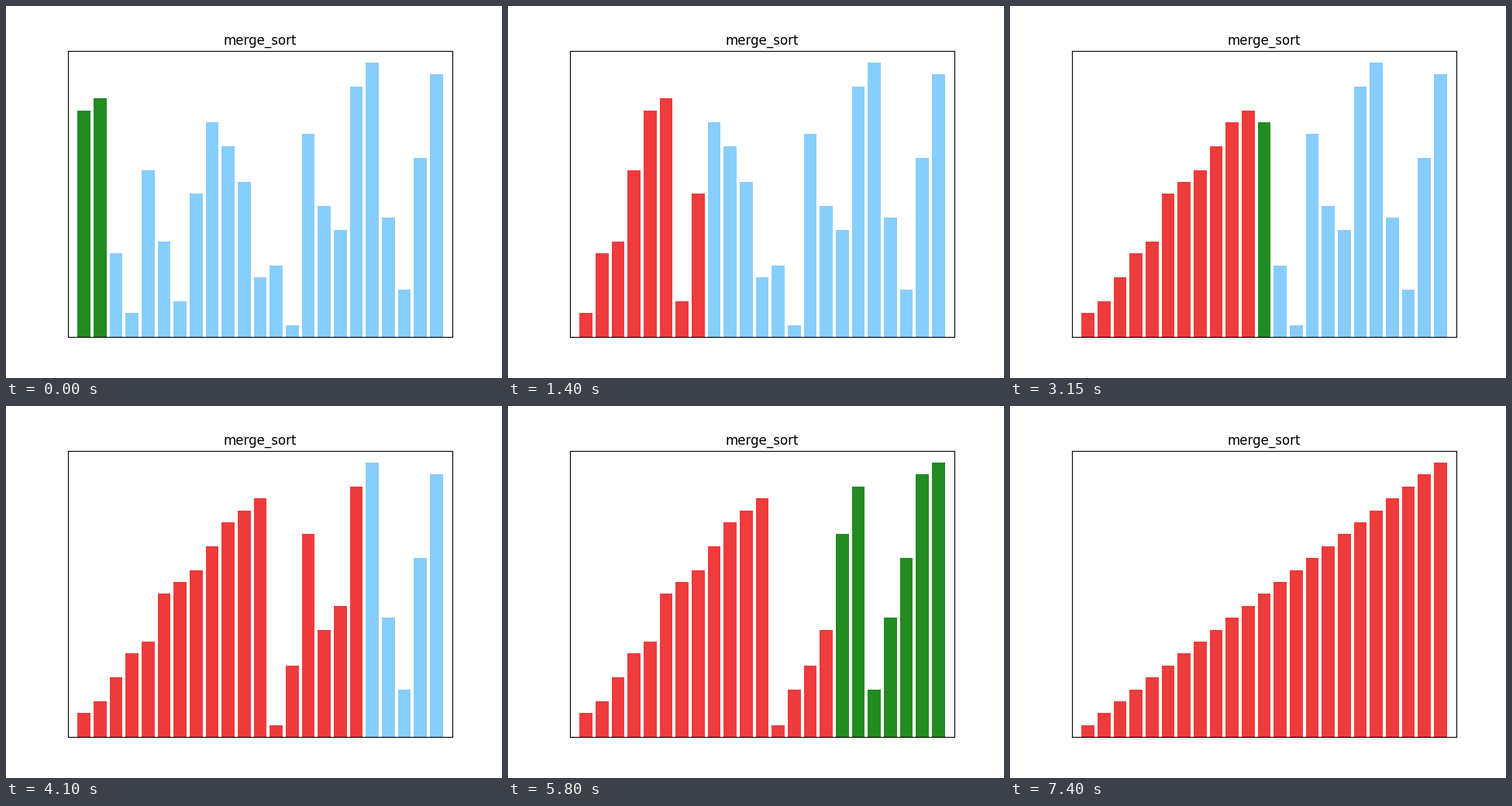
Animation of 640 by 480 pixels, one loop 7.5 s. Source, as a matplotlib script:

```python
import matplotlib.pyplot as plt
from matplotlib.animation import FuncAnimation

VALUES = [19, 20, 7, 2, 14, 8, 3, 12, 18, 16, 13, 5,
          6, 1, 17, 11, 9, 21, 23, 10, 4, 15, 22]
N = len(VALUES)
IDLE, ACTIVE, PLACED = "#87CEFF", "#228B22", "#EE3B3B"
TICK = 50


def merge_sort(data, colors, lo, hi):
    """Sort data[lo..hi] in place, yielding a snapshot after every step."""
    if lo >= hi:
        return
    mid = (lo + hi) // 2
    yield from merge_sort(data, colors, lo, mid)
    yield from merge_sort(data, colors, mid + 1, hi)

    left, right = data[lo:mid + 1], data[mid + 1:hi + 1]
    colors[lo:hi + 1] = [ACTIVE] * (hi - lo + 1)
    yield data[:], colors[:]
    for k in range(lo, hi + 1):
        take_left = not right or (left and left[0] <= right[0])
        data[k] = (left if take_left else right).pop(0)
        colors[k] = PLACED
        yield data[:], colors[:]
    # Each finished merge is held for one more tick.
    yield data[:], colors[:]


steps = list(merge_sort(VALUES[:], [IDLE] * N, 0, N - 1))

fig, ax = plt.subplots(figsize=(6.4, 4.8), dpi=100)
ax.set_title("merge_sort", fontfamily="DejaVu Sans", fontsize=12)
ax.set_xlim(-1, N)
ax.set_ylim(0, N + 1)
ax.set_xticks([])
ax.set_yticks([])
bars = ax.bar(range(N), VALUES, width=0.8, color=IDLE)


def draw(i):
    for bar, height, color in zip(bars, *steps[i]):
        bar.set_height(height)
        bar.set_facecolor(color)
    return list(bars)


anim = FuncAnimation(fig, draw, frames=len(steps), interval=TICK,
                     init_func=lambda: draw(0), repeat=True, repeat_delay=0)
plt.show()
```
